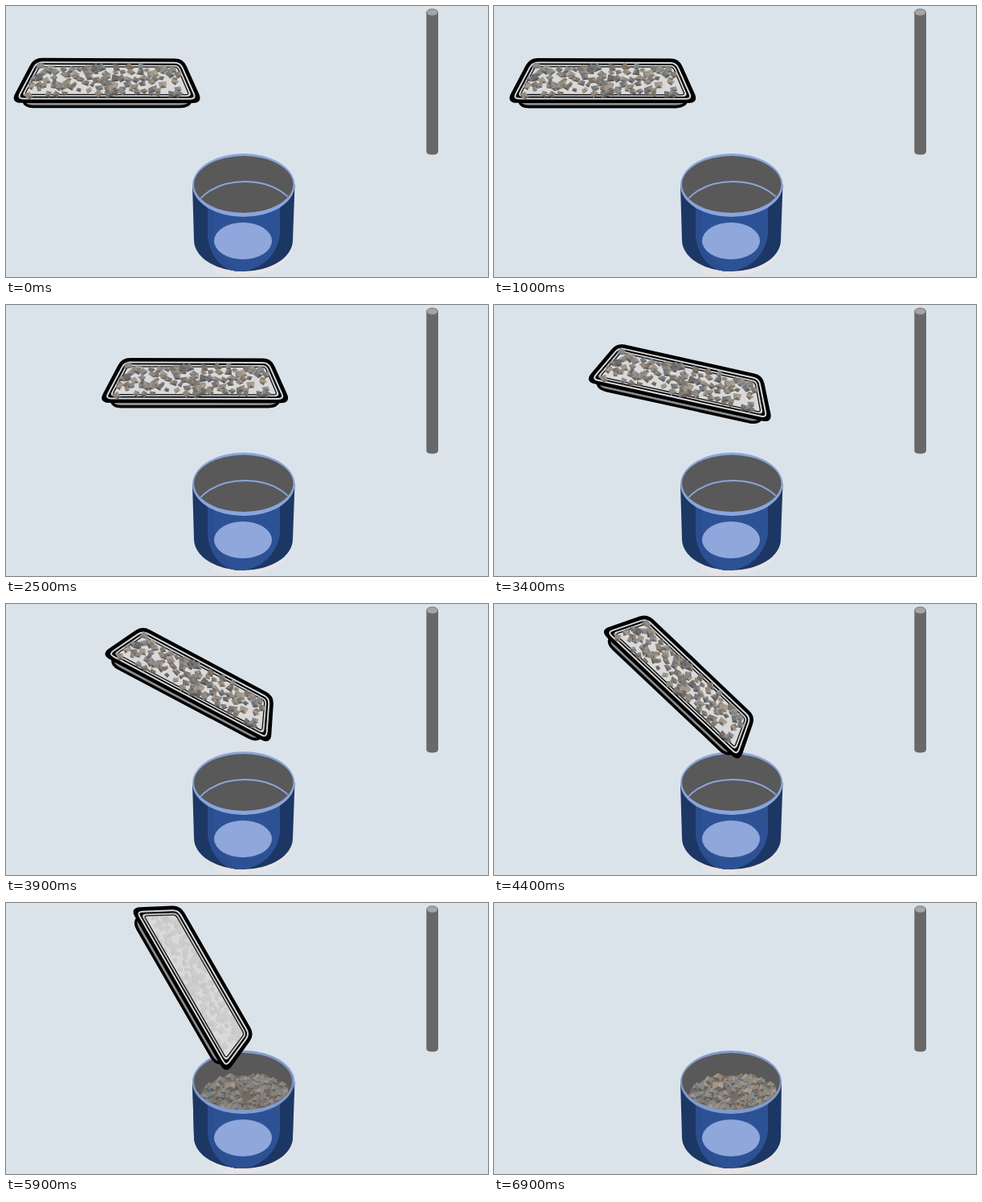
These frames come from a looping animation (600 by 338 pixels, 7000 ms). An HTML page:

```html
<!DOCTYPE html>
<html lang="en">
<head>
<meta charset="utf-8">
<title>Stones into a pot</title>
<style>
  html, body { margin: 0; height: 100%; overflow: hidden; background: #dbe3ea; }
  svg { display: block; width: 100%; height: 100%; }
</style>
</head>
<body>
<svg id="stage" viewBox="0 0 600 338"></svg>
<script>
const LOOP = 7000, STEP = 100;
const TONES = ['#7b7874', '#91867a', '#6c6a68', '#a19688', '#858789', '#7d7368', '#8e877d', '#74777a'];

let seed = 11;
const random = () => (seed = seed * 16807 % 2147483647) / 2147483647;
const between = (a, b) => a + (b - a) * random();
const poly = (points, attrs) =>
  `<polygon points="${points.map(p => p.map(v => v.toFixed(1))).join(' ')}" ${attrs}/>`;

// An angular block: one lit face with a darker side below and a paler one above.
function stone(x, y, size) {
  const turn = between(0, 6.28), corners = [];
  for (let i = 0; i < 4; i++) {
    const a = turn + i * 1.571 + between(-.35, .35), r = size * between(.8, 1.25);
    corners.push([x + r * Math.cos(a), y + r * .85 * Math.sin(a)]);
  }
  const [low, next, , top] = [...corners].sort((a, b) => b[1] - a[1]);
  const tone = TONES[Math.floor(random() * TONES.length)];
  return poly(corners, `fill="${tone}"`) +
    poly([low, next, [x + 1, y + 1]], 'fill="#4a4642" opacity=".6"') +
    poly([top, next, [x, y - 1]], 'fill="#c2b7a7" opacity=".35"');
}

function trayStones() {
  let out = '';
  for (let row = 0; row < 6; row++) {
    for (let col = 0; col < 22; col++) {
      if (random() < .06 + .05 * row) continue;
      const u = col / 10.5 - 1, y = 77.5 + 6.3 * row + between(-2.5, 2.5);
      out += stone(125 - .6 * row + u * (85 + 1.8 * row) + between(-3, 3), y, between(4, 6.5));
    }
  }
  return out;
}

function potStones() {
  let out = '<ellipse cx="298" cy="239" rx="55" ry="24" fill="#756d63"/>';
  for (let i = 0; i < 150; i++) {
    const a = between(0, 6.28), r = Math.sqrt(random());
    out += stone(298 + 53 * r * Math.cos(a), 238 + 23 * r * Math.sin(a), between(4.5, 7.5));
  }
  return out;
}

function pot(right, rim, content) {
  const left = 232, cx = (left + right) / 2, rx = (right - left) / 2;
  return `
    <path d="M${left} 223L234 292A61.5 39 0 0 0 357 292L${right} 223Z" fill="#1d3765"/>
    <path d="M251 245V285C253 312 270 331 291 331S337 315 341 285V245Z" fill="#2c5295"/>
    <path d="M251 245V285C253 312 270 331 291 331C274 322 261 305 259 285V245Z" fill="#2a4e90"/>
    <ellipse cx="295" cy="293" rx="36" ry="23" fill="#8fa7da"/>
    <ellipse cx="${cx}" cy="223.5" rx="${rx}" ry="39.5" fill="${rim}"/>
    <ellipse cx="${cx}" cy="222.5" rx="${rx - 2}" ry="35.5" fill="#595959"/>
    <g clip-path="url(#mouth)">${content}</g>`;
}

// Closed outline whose corners are rounded off over the given length.
function rounded(points, length, attrs) {
  const toward = ([x, y], [tx, ty]) => {
    const k = length / Math.hypot(tx - x, ty - y);
    return `${(x + (tx - x) * k).toFixed(1)} ${(y + (ty - y) * k).toFixed(1)}`;
  };
  const n = points.length;
  const d = points.map((p, i) =>
    `${i ? 'L' : 'M'}${toward(p, points[(i + n - 1) % n])}Q${p} ${toward(p, points[(i + 1) % n])}`);
  return `<path d="${d.join('')}Z" ${attrs}/>`;
}

// Outline of the tray rim, moved inwards by d.
const rim = (d, attrs) => rounded([
  [36 + d * .65, 67 + d * .95], [219 - d * .65, 67.6 + d * .95],
  [242 - d * 1.58, 118.8 - d * .9], [9 + d * 1.58, 118.5 - d * .9]
], 9 - d * .6, attrs);

const floorLine = '<ellipse cx="297.5" cy="260" rx="63" ry="41" fill="none" stroke="#8aa5da" stroke-width="2"/>';

document.getElementById('stage').innerHTML = `
  <clipPath id="mouth"><ellipse cx="295.5" cy="222.5" rx="61" ry="35.5"/></clipPath>
  <rect width="600" height="338" fill="#dbe3ea"/>
  <path d="M523.3 8V182A7.4 4 0 0 0 538 182V8Z" fill="#686868"/>
  <ellipse cx="530.6" cy="8" rx="7" ry="4.2" fill="#a5a5a5" stroke="#686868" stroke-width=".8"/>
  <path d="M258 322V331L274 338H291L316 334C338 329 353 318 354 302Z" fill="#e6e4e6"/>
  <g id="emptyPot">${pot(359.5, '#8aa5da', floorLine)}</g>
  <g id="fullPot">${pot(358, '#829bcc', potStones())}</g>
  <g id="tray">
    <path d="M22 119Q24 125.5 34 125.5H217Q227 125.5 230 119Z" fill="#8c8c8c" stroke="#000" stroke-width="3.6"/>
    ${rim(0, 'fill="#000" stroke="#000" stroke-width="4.4"')}
    ${rim(3.4, 'fill="#000" stroke="#d6d8da" stroke-width="2"')}
    ${rim(7.4, 'fill="#d9d9d9" stroke="#d0d2d4" stroke-width="1.8"')}
    ${rim(9, 'fill="#d9d9d9" stroke="#111" stroke-width="1.3"')}
    <g id="load">${trayStones()}</g>
  </g>`;

const part = id => document.getElementById(id);
const [emptyPot, fullPot, tray, load] = ['emptyPot', 'fullPot', 'tray', 'load'].map(part);
const progress = (t, start, length) => Math.min(1, Math.max(0, (t - start) / length));
const easeInOut = u => u < .5 ? .5 * (2 * u) ** 2.5 : 1 - .5 * (2 - 2 * u) ** 2.5;

// Short speeding up, steady turn, long slowing down; degrees over 2.4 seconds.
function tilt(t) {
  const s = 2.4 * progress(t, 2900, 2400), speed = 31, up = .2, down = .73;
  if (s < up) return speed * s * s / (2 * up);
  if (s < 2.4 - down) return speed * (s - up / 2);
  return 60 - speed * (2.4 - s) ** 2 / (2 * down);
}

function draw(now) {
  const t = Math.floor(now % LOOP / STEP) * STEP;
  const slide = easeInOut(progress(t, 500, 2000));
  const pour = progress(t, 5300, 700);
  tray.setAttribute('transform',
    `translate(${109.5 * slide} ${1.2 * slide}) rotate(${tilt(t)} 125.5 96.5)`);
  tray.setAttribute('visibility', t < 6500 ? 'visible' : 'hidden');
  load.setAttribute('opacity', 1 - pour);
  fullPot.setAttribute('opacity', pour);
  emptyPot.setAttribute('visibility', t < 6900 ? 'visible' : 'hidden');
}

const start = performance.now();
function tick() {
  draw(performance.now() - start);
  requestAnimationFrame(tick);
}
tick();
</script>
</body>
</html>
```
